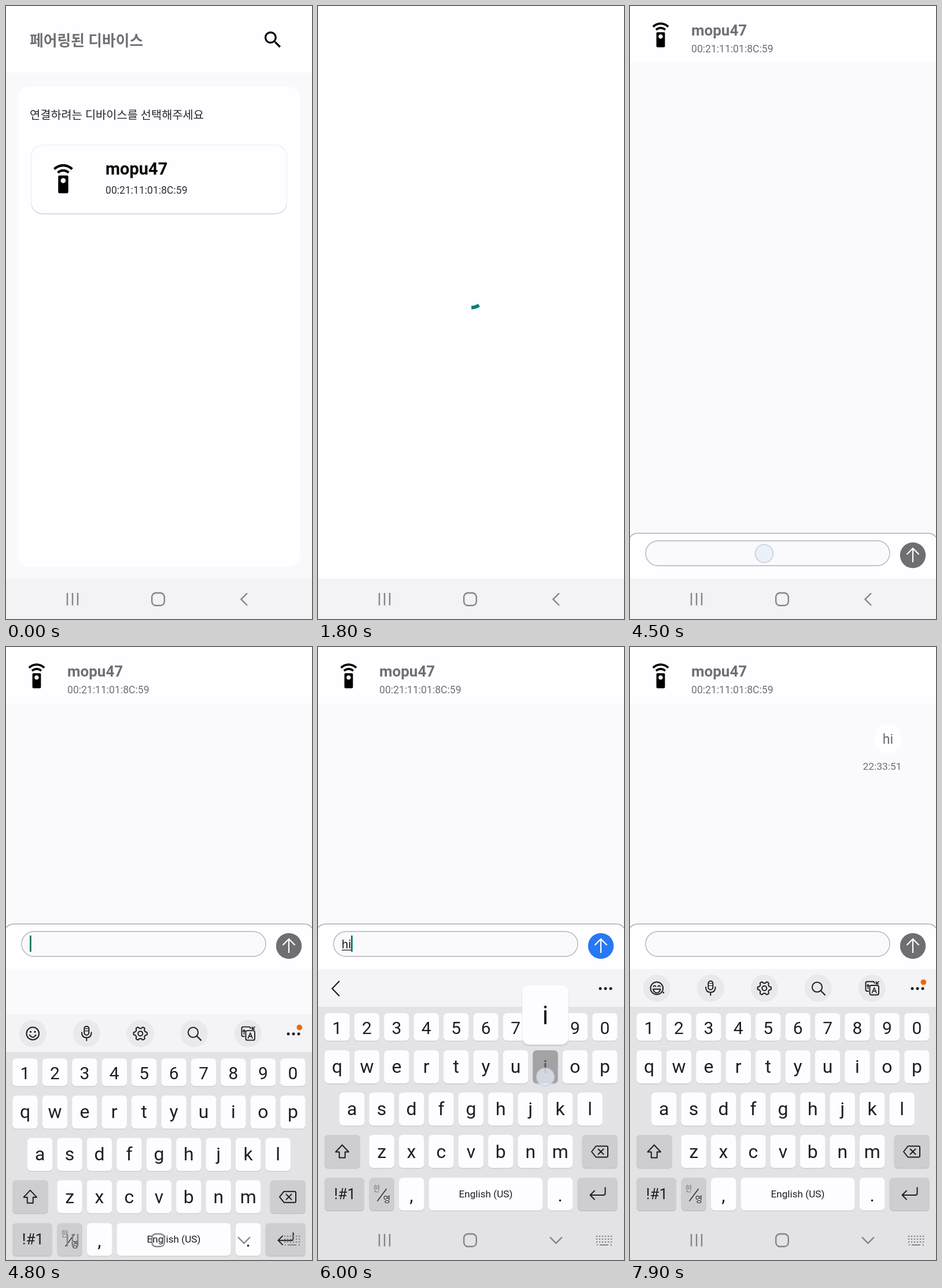
An HTML page for the animation above (8 s loop, 529 px wide and 1058 px high).

```html
<!DOCTYPE html>
<html lang="ko">
<head>
<meta charset="utf-8">
<title>Bluetooth chat</title>
<style>
  html, body { margin: 0; width: 100%; height: 100%; overflow: hidden; background: #fefdff; }
  svg { display: block; width: 100vw; height: 100vh; }
  text { font-family: Roboto, "Noto Sans CJK KR", "Noto Sans CJK", sans-serif; }
</style>
</head>
<body>
<svg id="stage" viewBox="0 0 529 1058"></svg>
<script>
const LOOP = 8000;
const INK = '#1f1f22', GREY = '#707073', TEAL = '#00796b';
const DEVICE = 'mopu47', ADDRESS = '00:21:11:01:8C:59';
const REMOTE = 'M15 9H9c-.55 0-1 .45-1 1v12c0 .55.45 1 1 1h6c.55 0 1-.45 1-1V10c0-.55-.45-1-1-1zm-3 6c-1.1 0-2-.9-2-2s.9-2 2-2 2 .9 2 2-.9 2-2 2zM7.05 6.05l1.41 1.41C9.37 6.56 10.62 6 12 6s2.63.56 3.54 1.46l1.41-1.41C15.68 4.78 13.93 4 12 4s-3.68.78-4.95 2.05zM12 0C8.96 0 6.21 1.23 4.22 3.22l1.41 1.41C7.26 3.01 9.51 2 12 2s4.74 1.01 6.36 2.64l1.41-1.41C17.79 1.23 15.04 0 12 0z';
const SEARCH = 'M15.5 14h-.79l-.28-.27C15.41 12.59 16 11.11 16 9.5 16 5.91 13.09 3 9.5 3S3 5.91 3 9.5 5.91 16 9.5 16c1.61 0 3.09-.59 4.23-1.57l.27.28v.79l5 4.99L20.49 19l-4.99-5zm-6 0C7.01 14 5 11.99 5 9.5S7.01 5 9.5 5 14 7.01 14 9.5 11.99 14 9.5 14z';

const stage = document.getElementById('stage');

function add(parent, tag, attrs = {}, content) {
  const node = document.createElementNS('http://www.w3.org/2000/svg', tag);
  for (const name in attrs) node.setAttribute(name, attrs[name]);
  if (content !== undefined) node.textContent = content;
  parent.appendChild(node);
  return node;
}
const group = (parent, attrs) => add(parent, 'g', attrs);
const rect = (parent, x, y, width, height, rx, fill, more) =>
  add(parent, 'rect', { x, y, width, height, rx, fill, ...more });
const circle = (parent, cx, cy, r, fill, more) => add(parent, 'circle', { cx, cy, r, fill, ...more });
const line = (parent, d, stroke, width, more) =>
  add(parent, 'path', { d, fill: 'none', stroke, 'stroke-width': width, ...more });
const label = (parent, x, y, size, fill, content, more) =>
  add(parent, 'text', { x, y, 'font-size': size, fill, ...more }, content);
const MID = { 'text-anchor': 'middle' };
const ROUND = { 'stroke-linecap': 'round', 'stroke-linejoin': 'round' };
const icon = (parent, d, x, y, scale) =>
  add(parent, 'path', { d, transform: `translate(${x} ${y}) scale(${scale})` });

const clamp = v => Math.max(0, Math.min(1, v));
const ramp = (t, from, to) => clamp((t - from) / (to - from));
const within = (t, from, to) => t >= from && t < to;
const smooth = p => p * p * (3 - 2 * p);
const fade = (node, v) => node.setAttribute('opacity', v);
const show = (node, on) => node.setAttribute('visibility', on ? 'visible' : 'hidden');

// Device list
const list = group(stage);
rect(list, 0, 0, 529, 1058, 0, '#f9f8fb');
rect(list, 0, 0, 529, 115, 0, '#fefdff');
label(list, 41, 69, 25.8, GREY, '페어링된 디바이스', { 'font-weight': 700 });
icon(list, SEARCH, 442.2, 39.2, 1.6);
rect(list, 20, 139, 488, 829, 20, '#fefdff');
label(list, 41, 195, 19.8, '#252528', '연결하려는 디바이스를 선택해주세요');
rect(list, 43, 241, 443, 118.5, 20, '#d6d5d8');
rect(list, 43, 239.5, 443, 118.5, 20, '#ececef');
const card = rect(list, 44, 240.5, 441, 117, 19.5, '#fefdff');
icon(list, REMOTE, 72.8, 273, 2.18);
label(list, 172, 291, 29, '#050505', DEVICE, { 'font-weight': 700 });
label(list, 172, 324, 17.6, '#303033', ADDRESS);

// Loading
const loading = group(stage);
rect(loading, 0, 0, 529, 1058, 0, '#fefdff');
const arc = line(loading, '', '#0b8074', 6);

// Chat
const chat = group(stage);
rect(chat, 0, 0, 529, 1058, 0, '#faf9fc');
rect(chat, 0, 0, 529, 98.5, 0, '#fefdff');
icon(chat, REMOTE, 30.8, 28.6, 1.85);
label(chat, 106, 51, 26, GREY, DEVICE, { 'font-weight': 700 });
label(chat, 106, 80, 17.6, GREY, ADDRESS);

const message = group(chat);
rect(message, 422, 131, 48, 53, 24, '#fefdff');
label(message, 446, 167, 23, '#69696c', 'hi', MID);
label(message, 469.5, 212, 17.4, GREY, '22:33:51', { 'text-anchor': 'end' });

const bar = group(chat);
add(bar, 'path', { d: 'M-2 988V921Q2 910 14 910H515Q527 910 531 921V988Z', fill: '#fefdff' });
line(bar, 'M-2 921Q2 910 14 910H515Q527 910 531 921', '#b0afb2', 1.4);
rect(bar, 27, 923, 422, 43, 21.5, '#faf9fc', { stroke: '#b5b4b7', 'stroke-width': 1.4 });
const draft = label(bar, 41, 952, 20.5, INK, '');
const underline = rect(bar, 41, 954.5, 16, 1.3, 0, INK);
const caret = rect(bar, 41, 930, 2.8, 28, 0, TEAL);
const send = circle(bar, 489, 948, 22.2, '#6f6e71');
line(bar, 'M489 960V936M478.5 946.5L489 936L499.5 946.5', '#fff', 2.2);

// Keyboard
const navBack = rect(stage, 0, 988.5, 529, 70, 0, '#f3f2f5');
const board = group(stage);
rect(board, 0, 556, 529, 66, 0, '#f4f3f6');
rect(board, 0, 621, 529, 960, 0, '#e3e2e5');

const tools = group(board);
for (let i = 0; i < 5; i++) circle(tools, 46.3 + 93 * i, 589, 23.5, '#e9e8eb');
const pen = { ...ROUND };
circle(tools, 46.3, 589, 10.8, 'none', { stroke: INK, 'stroke-width': 2 });
const smile = group(tools);
line(smile, 'M40.8 591.5Q46.3 599 51.8 591.5', INK, 2, pen);
circle(smile, 42.6, 586, 1.6, INK);
circle(smile, 50, 586, 1.6, INK);
const laugh = group(tools);
line(laugh, 'M40 590.5H52.6Q51 597 46.3 597T40 590.5', INK, 2, pen);
line(laugh, 'M40.5 586Q42.5 583 44.5 586M48.3 586Q50.3 583 52.3 586', INK, 1.8, pen);
circle(laugh, 57.8, 596.5, 1.4, INK);
rect(tools, 135.3, 576.5, 8, 15, 4, 'none', { stroke: INK, 'stroke-width': 2 });
line(tools, 'M131 587Q131 596 139.3 596T147.6 587M139.3 596V601', INK, 2, pen);
line(tools, 'M136.3 580.5H142.3M136.3 584.5H142.3', INK, 1.2);
let gear = '';
for (let i = 0; i <= 72; i++) {
  const a = i / 72 * 2 * Math.PI;
  const r = 10.3 + 1.5 * Math.tanh(3 * Math.cos(6 * a + Math.PI));
  gear += `${i ? 'L' : 'M'}${(232.3 + r * Math.sin(a)).toFixed(2)} ${(589 - r * Math.cos(a)).toFixed(2)}`;
}
line(tools, gear + 'Z', INK, 2, pen);
circle(tools, 232.3, 589, 4, 'none', { stroke: INK, 'stroke-width': 2 });
circle(tools, 323.5, 587, 8.6, 'none', { stroke: INK, 'stroke-width': 2 });
line(tools, 'M329.8 593.3L337 600.5', INK, 2.2, pen);
line(tools, 'M412 594H410Q407.500 594 407.500 591.500V580Q407.500 577.500 410 577.500H420Q422.500 577.500 422.500 580', INK, 1.9, pen);
rect(tools, 414.5, 584, 15.5, 16.5, 3, '#e9e8eb', { stroke: INK, 'stroke-width': 1.9 });
line(tools, 'M418.500 597L422.300 588L426 597M420 594H424.800M411.500 590V583M409.500 585L411.500 582.500L413.500 585M430 577.500L425.500 581M425.500 577.500V581.500H429.500', INK, 1.6, pen);
circle(tools, 507.3, 578.5, 4.8, '#f26500');
for (const x of [488, 497, 506]) circle(board, x, 589.5, 2.5, INK);

const hints = group(board);
line(hints, 'M37 576.5L24.500 589.500L37 602.500', INK, 2.2);
const words = group(hints);
label(words, 130.5, 598.5, 25.5, INK, 'his', MID);
label(words, 264.5, 598.5, 25.5, INK, 'him', MID);
const wave = group(hints);
const hand = group(wave, { transform: 'rotate(-28 398 590)' });
const fingers = 'M393 590V581M397 588V578.500M401 588V579.500M405 590V583M393 596L388.500 590.500';
line(hand, fingers, '#e59600', 5.4, pen);
add(hand, 'ellipse', { cx: 399, cy: 595, rx: 8.3, ry: 8, fill: '#e59600' });
line(hand, fingers, '#fbc02d', 4, pen);
add(hand, 'ellipse', { cx: 399, cy: 594.5, rx: 7.6, ry: 7.4, fill: '#fbc02d' });
line(wave, 'M402 577Q408 579 409.500 585M386 595Q388 600 393 602', '#9a9a9d', 1.3, pen);

const keys = {};
function key(x, y, w, h, dark) {
  rect(board, x, y + 1.5, w, h, 6.5, dark ? '#c3c2c5' : '#cfced1');
  return rect(board, x, y, w, h, 6.5, dark ? '#cecdd0' : '#fdfcff');
}
function keyRow(chars, first, top, height, size, baseline) {
  [...chars].forEach((c, i) => {
    const x = first + 51.43 * i;
    const face = key(x - 21.7, top, 43.4, height);
    keys[c] = { face, glyph: label(board, x, baseline, size, INK, c, MID), x, top };
  });
}
keyRow('1234567890', 33, 632, 47.5, 30, 667.5);
keyRow('qwertyuiop', 33, 696, 57, 32, 735);
keyRow('asdfghjkl', 58.7, 769, 57, 32, 808);
keyRow('zxcvbnm', 110.1, 842, 57, 32, 881.5);
key(11, 842, 62, 57, true);
line(board, 'M41.800 859.500L30.500 871.500H36.800V881.500H46.800V871.500H53Z', INK, 2, pen);
key(456.5, 842, 61.5, 57, true);
line(board, 'M473 871L480.500 861.500H499Q501 861.500 501 863.500V878.500Q501 880.500 499 880.500H480.500ZM484.500 866.500L493.500 875.500M493.500 866.500L484.500 875.500', INK, 2, pen);
key(11, 916, 69, 56.5, true);
label(board, 46.5, 953, 26, INK, '!#1', MID);
key(88.5, 916, 43.5, 56.5, true);
label(board, 101.5, 939, 13, '#77777a', '한', MID);
line(board, 'M102.500 956.500L118.500 935', INK, 1.3);
label(board, 119, 958, 13.5, INK, '영', MID);
key(140, 916, 43.4, 56.5);
label(board, 161.5, 957, 32, INK, ',', MID);
key(191.5, 916, 197, 56.5);
label(board, 290, 950, 17.2, INK, 'English (US)', MID);
key(397, 916, 43.4, 56.5);
label(board, 418.7, 957, 32, INK, '.', MID);
key(448.5, 916, 69.5, 56.5, true);
line(board, 'M496.500 933V942.500Q496.500 946 493 946H471M478 938.500L470.500 946L478 953.500', INK, 2, pen);

const popup = group(board);
rect(popup, -40.5, 2, 81, 103, 12, '#c9c8cb', { opacity: .6 });
rect(popup, -40, 0, 80, 102, 12, '#fdfcff');
const popupGlyph = label(popup, 0, 67, 45, INK, '', MID);

// Navigation icons
const nav = group(stage);
line(nav, 'M106 1013V1034.500M115 1013V1034.500M124 1013V1034.500', '#858487', 2.4);
rect(nav, 252.2, 1013, 21.6, 21.8, 7, 'none', { stroke: '#858487', 'stroke-width': 2.4 });
const back = line(nav, 'M5.500 -10.500L-5 0L5.500 10.500', '#858487', 2.4);
const switcher = group(nav);
for (let i = 0; i < 18; i++) circle(switcher, 482 + 5 * (i % 6), 1017 + 5 * Math.floor(i / 6), 1.3, '#858487');
line(switcher, 'M482 1032H484M487 1032H502M505.500 1032H508', '#858487', 2);

const finger = group(stage);
circle(finger, 0, 0, 15.5, '#e6ecf7', { 'fill-opacity': .72, stroke: '#b7c6df', 'stroke-width': 1.6, 'stroke-opacity': .8 });

const taps = [
  { from: 500, to: 640, x: 262, y: 302 },
  { from: 4500, to: 4620, x: 232, y: 945 },
  { from: 5480, to: 5600, x: 314, y: 816 },
  { from: 5900, to: 6020, x: 393, y: 742 },
  { from: 6860, to: 7040, x: 483, y: 518 }
];
const presses = [
  { char: 'h', from: 5480, to: 5640 },
  { char: 'i', from: 5900, to: 6060 }
];
const caretOn = [[4600, 5100], [5600, 6500], [6900, 7600]];

// Cubic segment y at a given x, solved by bisection
function bezier(x, [x0, y0, x1, y1, x2, y2, x3, y3]) {
  const at = (s, a, b, c, d) => {
    const r = 1 - s;
    return r * r * r * a + 3 * r * r * s * b + 3 * r * s * s * c + s * s * s * d;
  };
  let lo = 0, hi = 1;
  for (let i = 0; i < 24; i++) {
    const s = (lo + hi) / 2;
    if (at(s, x0, x1, x2, x3) < x) lo = s; else hi = s;
  }
  return at(lo, y0, y1, y2, y3);
}
const head = u => u < .5
  ? bezier(u, [0, 0, .2, 0, .1, 1, .5, .96])
  : bezier(u, [.5, .96, .966, .96, .993, 1, 1, 1]);
const tail = u => u < .5 ? 0 : bezier(u, [.5, 0, .7, 0, .6, 1, 1, 1]);

function spin(t) {
  const cycles = (t - 367) / 1333 + 5;
  const u = cycles % 1;
  const base = cycles * 144 + u * 90 - 98;
  const from = (base + 270 * tail(u) - 6.5) * Math.PI / 180;
  const to = (base + 270 * head(u) + 6.5) * Math.PI / 180;
  const point = a => `${264.5 + 25.6 * Math.cos(a)} ${495 + 25.6 * Math.sin(a)}`;
  arc.setAttribute('d', `M${point(from)}A25.6 25.6 0 ${to - from > Math.PI ? 1 : 0} 1 ${point(to)}`);
}

function draw(t) {
  const chatIn = smooth(ramp(t, 2400, 2700));
  show(list, t < 1200);
  show(loading, within(t, 800, 2700));
  show(chat, t >= 2400);
  fade(loading, smooth(ramp(t, 800, 1150)));
  fade(chat, chatIn);
  card.setAttribute('fill', within(t, 500, 900) ? '#f0eff2' : '#fefdff');
  spin(t);

  const open = t >= 4600;
  const drop = 502 * Math.pow(1 - ramp(t, 4600, 5035), 3);
  show(board, open);
  board.setAttribute('transform', `translate(0 ${drop})`);
  bar.setAttribute('transform', `translate(0 ${open ? -432 : 0})`);
  back.setAttribute('transform', `translate(411.500 1024) rotate(${-90 * ramp(t, 4600, 4760)})`);
  show(switcher, t >= 4700);

  const typed = within(t, 5600, 7100) ? (t < 6000 ? 'h' : 'hi') : '';
  const width = [0, 11.3, 16][typed.length];
  draft.textContent = typed;
  underline.setAttribute('width', width);
  caret.setAttribute('x', 41 + width);
  show(caret, caretOn.some(([from, to]) => within(t, from, to)));
  send.setAttribute('fill', typed ? '#2878f5' : '#6f6e71');
  fade(message, ramp(t, 7100, 7300));

  const hinting = within(t, 5700, 7200);
  const laughing = within(t, 5050, 5700) || t >= 7750;
  fade(tools, hinting ? 0 : 1);
  fade(hints, hinting ? 1 : 0);
  fade(words, t >= 6100 ? 1 : 0);
  fade(wave, t >= 6400 ? 1 : 0);
  fade(smile, laughing ? 0 : 1);
  fade(laugh, laughing ? 1 : 0);

  const press = presses.find(p => within(t, p.from, p.to));
  fade(popup, press ? 1 : 0);
  for (const p of presses) {
    keys[p.char].face.setAttribute('fill', p === press ? '#a3a2a5' : '#fdfcff');
    keys[p.char].glyph.setAttribute('fill', p === press ? '#58585b' : INK);
  }
  if (press) {
    const k = keys[press.char];
    popup.setAttribute('transform', `translate(${k.x} ${k.top - 112})`);
    popupGlyph.textContent = press.char;
  }

  const tap = taps.find(p => within(t, p.from, p.to));
  show(finger, tap);
  if (tap) finger.setAttribute('transform', `translate(${tap.x} ${tap.y})`);
}

const start = performance.now();
function tick() {
  draw((performance.now() - start) % LOOP);
  requestAnimationFrame(tick);
}
tick();
</script>
</body>
</html>
```
